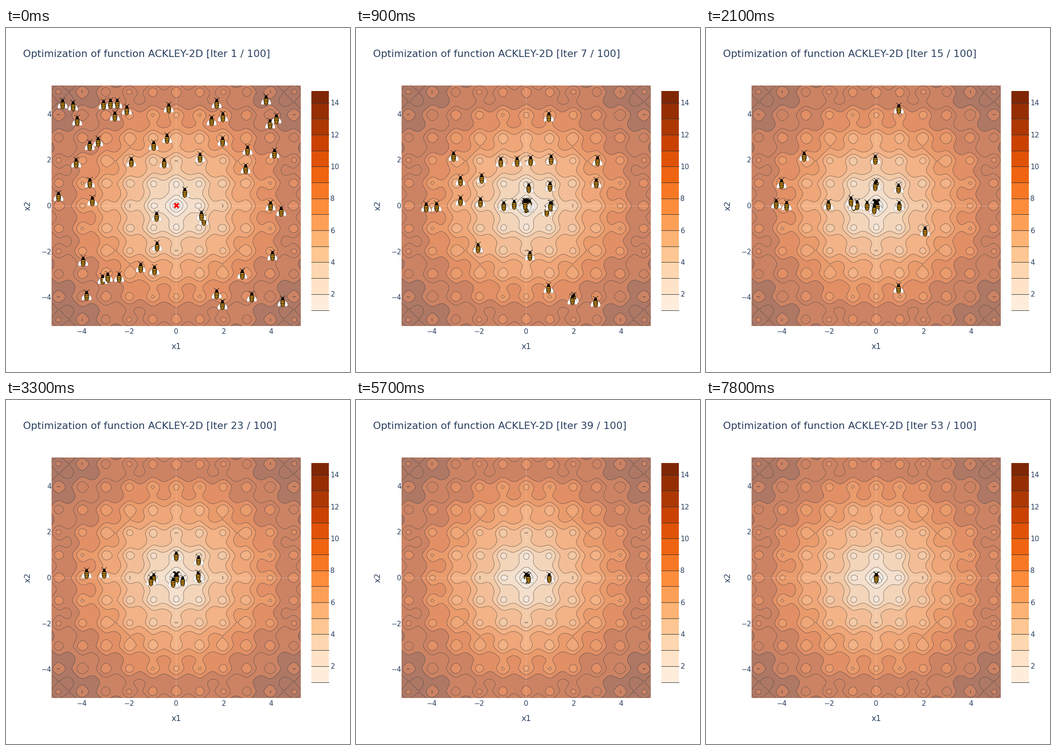
Write a matplotlib script that moves like this. It is 748 px wide and 748 px high and loops after 8 s.

```python
import numpy as np
import matplotlib.pyplot as plt
from matplotlib.animation import FuncAnimation
from matplotlib.collections import PolyCollection
from matplotlib.patches import Rectangle

SIZE, DPI, PX = 748, 100, 0.72
INK = "#2a3f5f"
ORIGIN = np.array([370.3, 386.5])
SCALE = np.array([51.5, -49.8])
BEES, STEPS, STEP_FRAMES = 50, 27, 3

plt.rcParams["font.family"] = "DejaVu Sans"
fig = plt.figure(figsize=(SIZE / DPI, SIZE / DPI), dpi=DPI, facecolor="white")
ax = fig.add_axes([0, 0, 1, 1])
ax.set(xlim=(0, SIZE), ylim=(SIZE, 0))
ax.axis("off")


def label(x, y, text, size, ha="center"):
    """Text whose digits are centred vertically on y."""
    return ax.text(x, y + 0.365 * size, text, fontsize=size * PX, color=INK,
                   ha=ha, va="baseline")


def ackley(x, y):
    bowl = -20 * np.exp(-0.2 * np.sqrt((x * x + y * y) / 2))
    waves = -np.exp((np.cos(2 * np.pi * x) + np.cos(2 * np.pi * y)) / 2)
    return 20 + np.e + bowl + waves


levels = list(range(1, 15))
bar_colors = plt.get_cmap("Oranges")(np.linspace(0, 1, 15))[:, :3]

# Contour map: the colours lie at 60 % over a bluish grey
map_colors = 0.6 * bar_colors + 0.4 * np.array([229, 236, 246]) / 255
for dark in (11, 13):
    map_colors[dark:dark + 2] = map_colors[dark:dark + 2].mean(axis=0)
grid = np.linspace(-5.25, 5.25, 100)
gx, gy = np.meshgrid(grid, grid)
px, py = ORIGIN[0] + SCALE[0] * gx, ORIGIN[1] + SCALE[1] * gy
height = ackley(gx, gy)
ax.contourf(px, py, height, levels=[-1, *levels, 16], colors=map_colors, zorder=1)
ax.plot([px.min(), px.max()], [ORIGIN[1]] * 2, color="white", alpha=0.15, lw=2 * PX)
ax.plot([ORIGIN[0]] * 2, [py.min(), py.max()], color="white", alpha=0.15, lw=2 * PX)
ax.contour(px, py, height, levels=levels, colors="#444444", alpha=0.8,
           linewidths=0.75 * PX, zorder=3)


# Colour bar
def bar_y(value):
    return 613.5 - 34.68 * (value - 1)


for value in levels:
    top = bar_y(min(value + 1, 14.73))
    ax.add_patch(Rectangle((664.5, top), 37.5, bar_y(value) - top,
                           fc=bar_colors[value], lw=0))
    ax.plot([664.5, 702], [bar_y(value)] * 2, color="#333333", lw=PX, zorder=4)
    if value % 2 == 0:
        label(705.5, bar_y(value), str(value), 15.2, "left")

# Axes
for tick in range(-4, 5, 2):
    name = str(tick).replace("-", "\u2212")
    label(ORIGIN[0] + SCALE[0] * tick, 659.5, name, 15.2)
    label(98.5, ORIGIN[1] + SCALE[1] * tick, name, 15.2, "right")
label(370, 692, "x1", 17.5)
ax.text(47.5, 386.5, "x2", fontsize=17.5 * PX, color=INK, rotation=90,
        ha="center", va="center")
title = label(37, 55, "", 21.85, "left")

# Cross on the optimum
for slope in (-1, 1):
    ax.plot([366.2, 375.2], [386 - 4.5 * slope, 386 + 4.5 * slope], color="red",
            lw=4 * PX, solid_capstyle="butt", zorder=5)


def oval(x, y, rx, ry, tilt=0):
    t = np.linspace(0, 2 * np.pi, 22)
    c, s = np.cos(tilt), np.sin(tilt)
    u, v = rx * np.cos(t), ry * np.sin(t)
    return np.column_stack([x + u * c - v * s, y + u * s + v * c])


def antenna(side):
    a, b, c = (side, -8), (side * 3, -11), (side * 6, -12.5)
    return np.array([a, b, c, b])


# Bee parts from back to front: shape, fill, edge, edge width
BLACK, AMBER = "#0a0703", "#fbb01e"
PARTS = [(oval(side * 6.3, 4.8, 3.8, 6.4, -0.5 * side), "white", "#777777", 0.4)
         for side in (-1, 1)]
PARTS += [(antenna(side), "none", BLACK, 0.4) for side in (-1, 1)]
PARTS += [(oval(0, -7, 2.9, 2.9), BLACK, "none", 0),
          (oval(0, 2.3, 5.2, 9.4), BLACK, "none", 0)]
PARTS += [(oval(0, y, 4.9 - 0.04 * (y - 2) ** 2, 1.05), AMBER, "none", 0)
          for y in (-1.2, 2.3, 5.8, 9)]
shapes, fills, edges, widths = zip(*PARTS)
swarm = PolyCollection([], facecolors=fills * BEES, edgecolors=edges * BEES,
                       linewidths=[w * PX for w in widths] * BEES, zorder=6)
ax.add_collection(swarm)

# Bees caught in a side valley: place, first and last step there
STRAGGLERS = [((0.97, 0), 4, 22), ((0.94, 0.77), 5, 12), ((-0.95, 0), 3, 12),
              ((0, 0.95), 4, 12), ((0.94, -3.6), 3, 9), ((-4, 0.97), 5, 8)]


def plan_flights():
    """Bees hop inwards from valley to valley until they settle at the optimum."""
    rng = np.random.default_rng(12)
    bees = rng.uniform(-5, 5, (BEES, 2))
    settle = -5 * np.log(1 - (np.arange(BEES) + 0.5) / BEES)
    flights = [bees.copy()]
    for step in range(1, STEPS):
        for bee in np.flatnonzero(rng.random(BEES) < 0.6):
            axis = rng.integers(2)
            hop = bees[bee, axis] * rng.uniform(0.1, 1)
            bees[bee, axis] = np.round(hop) + rng.normal(0, 0.12)
        home = settle < step
        bees[home] = rng.normal(0, 0.08 * np.exp(-step / 6), (home.sum(), 2))
        if step == STEPS - 1:
            bees[:] = 0
        for bee, (place, first, last) in enumerate(STRAGGLERS):
            if first <= step <= last:
                bees[bee] = place
        flights.append(bees.copy())
    return ORIGIN + SCALE * np.array(flights)


FLIGHTS = plan_flights()


def draw(frame):
    step = frame // STEP_FRAMES
    title.set_text(f"Optimization of function ACKLEY-2D [Iter {1 + 2 * step} / 100]")
    swarm.set_verts([shape + spot for spot in FLIGHTS[step] for shape in shapes])
    return title, swarm


anim = FuncAnimation(fig, draw, frames=STEPS * STEP_FRAMES - 1, interval=100,
                     repeat=True, repeat_delay=0)
plt.show()
```
